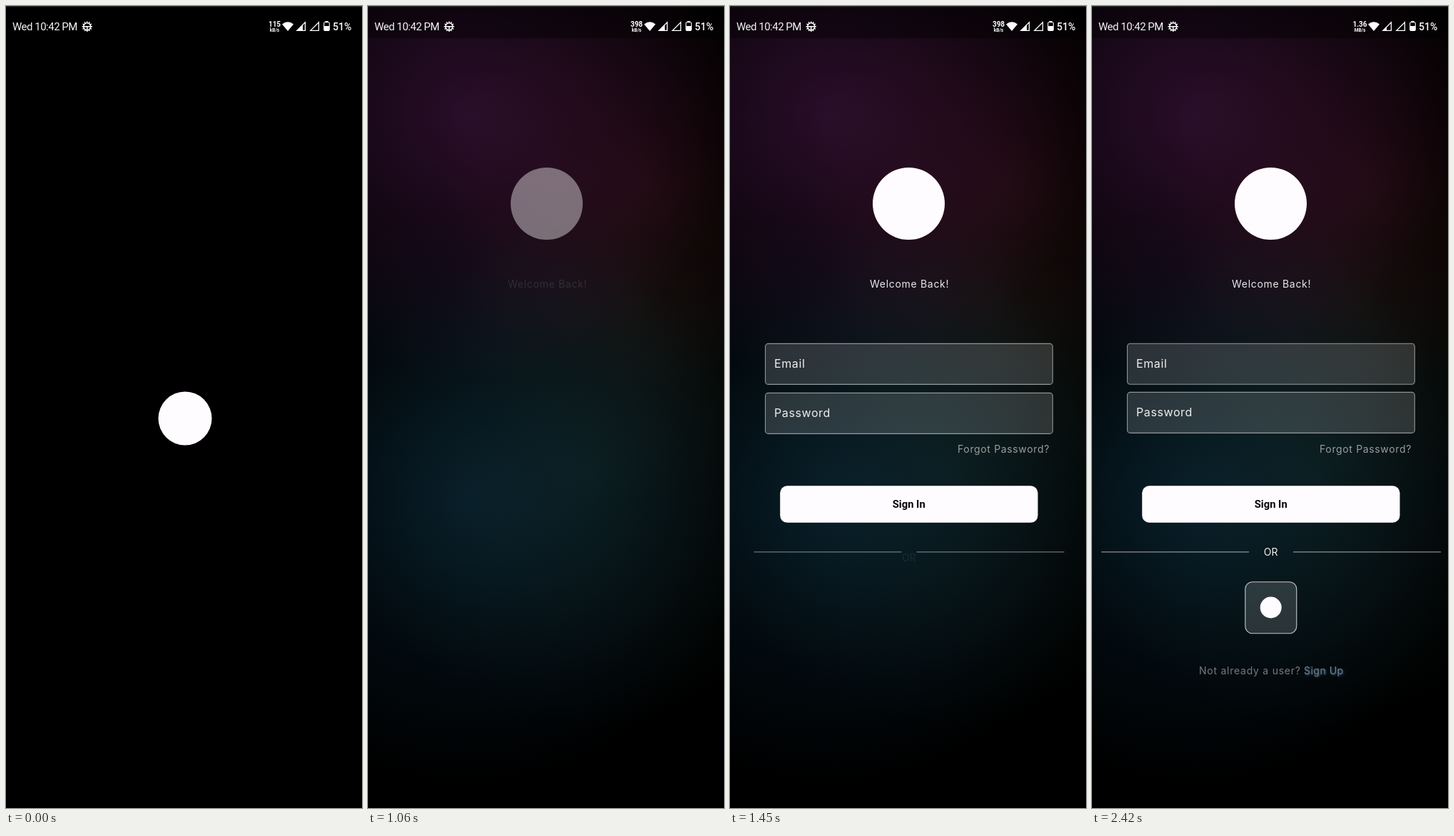
Animation of 499x1122 px, one loop 2450 ms. Source, as an HTML page with a canvas:

```html
<!DOCTYPE html>
<html lang="en">
<head>
<meta charset="utf-8">
<title>Sign in</title>
<style>
  html, body { margin: 0; width: 100%; height: 100%; overflow: hidden; background: #000; }
  canvas { display: block; width: 100%; height: 100%; }
</style>
</head>
<body>
<canvas id="stage" width="499" height="1122"></canvas>
<script>
const W = 499, H = 1122, LOOP = 2450;
const WHITE = '#fffcff';
const BODY = 'Inter, sans-serif';
const UI = 'Roboto, sans-serif';
const ctx = document.getElementById('stage').getContext('2d');

// x, y, radius, colour of each glow, added together
const GLOWS = [
  [140, 150, 375, '41,14,41'],
  [390, 250, 290, '20,5,7'],
  [380, 430, 260, '8,8,6'],
  [140, 690, 400, '5,23,34'],
  [310, 660, 350, '8,17,15']
];

const ramp = (t, from, to) => Math.min(1, Math.max(0, (t - from) / (to - from)));
const settle = (t, from, to, dist) => dist * (1 - ramp(t, from, to)) ** 2;
const white = a => `rgba(255,255,255,${a})`;

function fade(alpha, draw) {
  if (alpha <= 0) return;
  ctx.save();
  ctx.globalAlpha = alpha;
  draw();
  ctx.restore();
}

function text(str, x, y, font, color, { align = 'left', spacing = 0 } = {}) {
  ctx.font = font;
  ctx.fillStyle = color;
  ctx.textAlign = align;
  ctx.letterSpacing = spacing + 'px';
  ctx.fillText(str, x, y);
}

function disc(x, y, r) {
  ctx.fillStyle = WHITE;
  ctx.beginPath();
  ctx.arc(x, y, r, 0, Math.PI * 2);
  ctx.fill();
}

function panel(x, y, w, h, r, fill, stroke) {
  ctx.beginPath();
  ctx.roundRect(x, y, w, h, r);
  ctx.fillStyle = fill;
  ctx.fill();
  if (stroke) {
    ctx.strokeStyle = stroke;
    ctx.lineWidth = 1.1;
    ctx.stroke();
  }
}

function poly(...p) {
  ctx.beginPath();
  for (let i = 0; i < p.length; i += 2) ctx.lineTo(p[i], p[i + 1]);
  ctx.closePath();
}

function background(t) {
  if (t < 670) return;
  fade(0.45 + 0.55 * ramp(t, 670, 1040), () => {
    ctx.globalCompositeOperation = 'lighter';
    for (const [x, y, r, rgb] of GLOWS) {
      const g = ctx.createRadialGradient(x, y, 0, x, y, r);
      g.addColorStop(0, `rgba(${rgb},1)`);
      g.addColorStop(1, 'rgba(0,0,0,1)');
      ctx.fillStyle = g;
      ctx.fillRect(x - r, y - r, r * 2, r * 2);
    }
  });
  ctx.fillStyle = 'rgba(0,0,0,0.4)';
  ctx.fillRect(0, 0, W, 45);
}

function gear(x, y) {
  ctx.strokeStyle = '#fff';
  ctx.lineWidth = 1.5;
  ctx.beginPath();
  ctx.arc(x, y, 5, 0, Math.PI * 2);
  for (let i = 0; i < 12; i++) {
    const c = Math.cos(i * Math.PI / 6), s = Math.sin(i * Math.PI / 6);
    ctx.moveTo(x + c * 5, y + s * 5);
    ctx.lineTo(x + c * 7.2, y + s * 7.2);
  }
  ctx.moveTo(x - 5, y);
  ctx.lineTo(x + 5, y);
  ctx.moveTo(x, y);
  ctx.lineTo(x, y + 5);
  ctx.stroke();
}

function signal(x, level) {
  ctx.fillStyle = ctx.strokeStyle = '#fff';
  ctx.lineWidth = 1.3;
  poly(x + 0.8, 34.4, x + 12.4, 34.4, x + 12.4, 22.8);
  ctx.stroke();
  if (level) {
    poly(x, 35, x + level, 35, x + level, 35 - level);
    ctx.fill();
  }
}

function statusBar(t) {
  ctx.fillStyle = '#2a2c2c';
  ctx.fillRect(0, 0, W, 1.3);
  text('Wed 10:42 PM', 9, 33.5, '15px ' + UI, '#f4f4f4', { spacing: -0.5 });
  gear(113.7, 28.7);

  const [rate, unit] = t < 300 ? ['115', 'kB/s'] : t < 2060 ? ['398', 'kB/s'] : ['1.36', 'MB/s'];
  const mid = t < 2060 ? 376.5 : 375.5;
  text(rate, mid, 29, 'bold 10px ' + UI, '#fff', { align: 'center' });
  text(unit, mid, 36, 'bold 6.5px ' + UI, '#fff', { align: 'center' });

  ctx.fillStyle = '#fff';
  ctx.beginPath();
  ctx.moveTo(395, 35);
  ctx.lineTo(387, 25.5);
  ctx.quadraticCurveTo(395, 19, 403, 25.5);
  ctx.fill();

  signal(407, t < 2060 ? 9 : 6);
  signal(426, 0);

  panel(445.7, 22.7, 7.6, 11.8, 1.5, '#000', '#fff');
  ctx.fillStyle = '#fff';
  ctx.fillRect(447.5, 21, 4, 2);
  ctx.fillRect(446, 28, 7, 6.5);
  text('51%', 458, 33.5, '500 14px ' + UI, '#fff');
}

function field(label, y) {
  panel(49.5, y, 402.8, 57, 4, white(0.15), white(0.52));
  text(label, 62, y + 33.3, '16px ' + BODY, '#f0eef0', { spacing: 0.6 });
}

function form(t) {
  fade(ramp(t, 918, 1270), () => disc(250.5, 276.5, 50.5));
  fade(ramp(t, 1040, 1200), () =>
    text('Welcome Back!', 196, 394, '14px ' + BODY, '#e9e6e9', { spacing: 0.7 }));
  fade(ramp(t, 1080, 1210), () => field('Email', 472.3 + settle(t, 1080, 1500, 6)));
  fade(ramp(t, 1090, 1220), () => field('Password', 540.4 + settle(t, 1100, 1608, 10.5)));
  fade(ramp(t, 1100, 1240), () =>
    text('Forgot Password?', 319, 624.5, '14px ' + BODY, '#9b9d9e', { spacing: 0.65 }));
  fade(ramp(t, 1090, 1250), () => {
    const y = 671.2 + settle(t, 1080, 1500, 4);
    panel(70.2, y, 361.3, 51.6, 10, WHITE);
    text('Sign In', 250.7, y + 31, 'bold 14.8px ' + UI, '#080808', { align: 'center' });
  });
}

function divider(t) {
  const shift = settle(t, 1160, 1960, 50.6);
  fade(ramp(t, 1160, 1530), () => {
    ctx.fillStyle = white(0.6);
    ctx.fillRect(13 + shift, 763.3, 207, 1.1);
    ctx.fillRect(282 - shift, 763.3, 207, 1.1);
  });
  fade(ramp(t, 1430, 1680), () =>
    text('OR', 250.7, 769 + settle(t, 1430, 1800, 9), '14px ' + BODY, '#efefef', { align: 'center' }));
}

function footer(t) {
  fade(ramp(t, 1480, 1760), () =>
    panel(214.8, 805.8, 72, 72, 10, white(0.15), white(0.75)));
  fade(ramp(t, 1740, 2010), () =>
    disc(250.7, 841.5 + settle(t, 1740, 2100, 25), 15));
  fade(ramp(t, 1650, 1990), () => {
    text('Not already a user?', 150, 934.5, '14px ' + BODY, '#777a7d', { spacing: 0.75 });
    ctx.shadowColor = '#3a5f80';
    ctx.shadowBlur = 3;
    ctx.shadowOffsetX = ctx.shadowOffsetY = 1;
    text('Sign Up', 297, 934.5, '14px ' + BODY, '#75808c', { spacing: 0.5 });
  });
}

function render(now) {
  const t = now % LOOP;
  ctx.fillStyle = '#000';
  ctx.fillRect(0, 0, W, H);
  background(t);
  statusBar(t);
  fade(1 - ramp(t, 220, 450), () => disc(251, 577, 37.5));
  form(t);
  divider(t);
  footer(t);
  requestAnimationFrame(render);
}
requestAnimationFrame(render);
</script>
</body>
</html>
```
